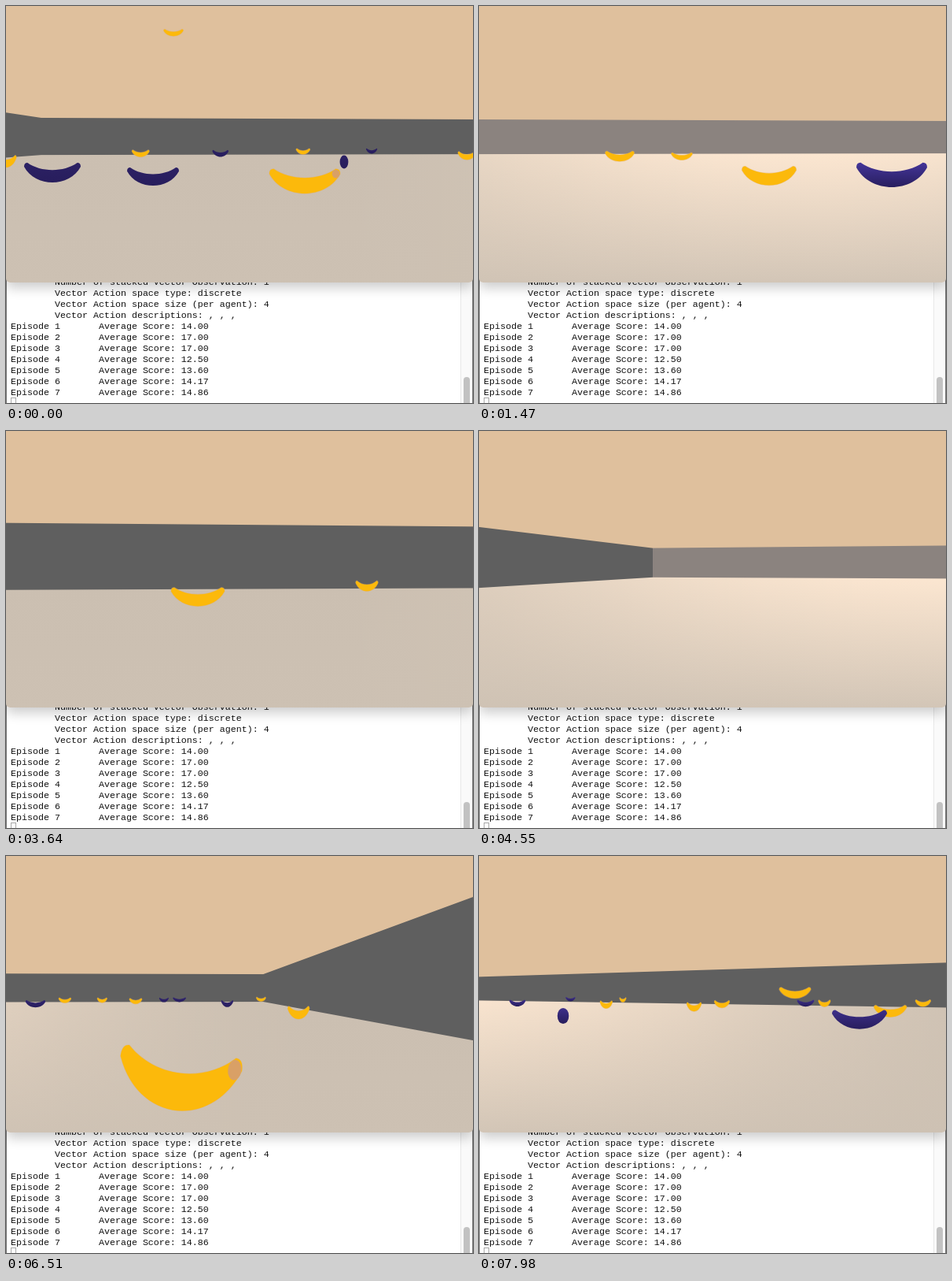
An HTML page with a canvas that plays this animation: 594 px wide and 504 px high, repeating every 8 s.

```html
<!DOCTYPE html>
<html lang="en">
<head>
<meta charset="utf-8">
<title>Banana collector</title>
<style>
  html, body { margin: 0; width: 100%; height: 100%; overflow: hidden; background: #fff; }
  #stage { position: absolute; left: 0; top: 0; width: 594px; height: 504px; overflow: hidden; background: #fff; }
  #stage > * { position: absolute; }
  canvas { left: 0; top: 0; border-radius: 0 0 5px 5px; box-shadow: 0 7px 15px rgba(0, 0, 0, .2); }
  pre { left: 6px; top: 344px; margin: 0; color: #111; font: 11.667px/14px "Liberation Mono", monospace; }
  .cursor { left: 6px; top: 497px; width: 5px; height: 12px; border: 1px solid #a8a8a8; }
  .track { left: 578px; top: 340px; width: 15px; height: 164px; background: #fafafa; border-left: 1px solid #e8e8e8; }
  .thumb { left: 582px; top: 471px; width: 8px; height: 45px; border-radius: 4px; background: #c2c2c2; }
  .edge { left: 0; top: 340px; width: 592px; height: 170px; border: solid #777; border-width: 0 1px; }
</style>
</head>
<body>
<div id="stage">
  <pre id="log"></pre>
  <div class="cursor"></div>
  <div class="track"></div>
  <div class="thumb"></div>
  <div class="edge"></div>
  <canvas id="view" width="594" height="351"></canvas>
</div>
<script>
const W = 594, H = 351, HORIZON = 173.4, ROOM = 130, SCALE = 1000;
const LOOP = 8000, STEP = 70, LENGTH = 1.45, LIGHT_YAW = 285;
const ctx = document.getElementById('view').getContext('2d');

const scores = ['14.00', '17.00', '17.00', '12.50', '13.60', '14.17', '14.86'];
document.getElementById('log').textContent = [
  'Number of stacked Vector Observation: 1',
  'Vector Action space type: discrete',
  'Vector Action space size (per agent): 4',
  'Vector Action descriptions: , , ,'
].map(line => ' '.repeat(8) + line)
  .concat(scores.map((s, i) => `Episode ${i + 1}       Average Score: ${s}`)).join('\n');

const rad = deg => deg * Math.PI / 180;
const banana = color => (sx, sy, size, squash = 1, tilt = 0) => ({ color, sx, sy, size, squash, tilt });
const yellow = banana('yellow'), blue = banana('blue');

// The walk: where the agent stands and looks, what lies close by, and how many bananas lie far off.
const stops = [
  { t: 0, x: 107.6, z: 65.4, yaw: 184.1, lens: 594, far: 6,
    close: [yellow(213, 34, 25), yellow(380, 223, 90), blue(59, 212, 72), blue(187, 217, 66), blue(430, 198, 47, .23)] },
  { t: 1470, x: 70.3, z: 58, yaw: 273.7, lens: 550, far: 0,
    close: [yellow(179, 191, 37), yellow(258, 191, 27), yellow(369, 216, 69), blue(525, 215, 90)] },
  { t: 2800, x: 39.45, z: 53.3, yaw: 244.1, lens: 476, far: 0,
    close: [yellow(28, 218, 78), yellow(187, 224, 101, .29)] },
  { t: 3640, x: 36, z: 36.65, yaw: 184.6, lens: 560, far: 0,
    close: [yellow(244, 211, 68), yellow(459, 197, 38, .75)] },
  { t: 5320, x: 111.7, z: 17, yaw: 320.7, lens: 676, far: 30,
    close: [yellow(513, 222, 100, .5)] },
  { t: 6510, x: 120.3, z: 44.7, yaw: 363.4, lens: 560, far: 14,
    close: [yellow(220, 287, 216, .72, 7)] },
  { t: 7980, x: 110, z: 70.5, yaw: 329.7, lens: 560, far: 10,
    close: [yellow(402, 174, 40), blue(107, 203, 56, .26), blue(484, 208, 70)] }
];

function axes(cam) {
  const s = Math.sin(rad(cam.yaw)), c = Math.cos(rad(cam.yaw));
  return { forward: [s, c], right: [c, -s] };
}

// On screen a wall's nearness (inverse depth) is linear in x; the nearest one shows.
function wallLines(cam) {
  const { forward, right } = axes(cam);
  return [
    [0, 1, ROOM - cam.z, '#5f5f5f'],
    [1, 0, ROOM - cam.x, '#5f5f5f'],
    [0, -1, cam.z, '#5f5f5f'],
    [-1, 0, cam.x, '#8b837f']
  ].map(([nx, nz, distance, color]) => {
    const base = SCALE * (nx * forward[0] + nz * forward[1]) / distance;
    const slope = SCALE * (nx * right[0] + nz * right[1]) / distance / cam.lens;
    return { color, near: x => base + slope * (x - W / 2) };
  });
}

const nearestWall = (walls, x) => walls.reduce((a, b) => b.near(x) > a.near(x) ? b : a);

let seed = 7;
function random() {
  seed = (seed * 16807) % 2147483647;
  return seed / 2147483647;
}

// Bananas strewn along the foot of a distant wall.
function scatter(stop) {
  const walls = wallLines(stop);
  return Array.from({ length: stop.far }, (_, i) => {
    const x = W * (i + random()) / stop.far;
    const wallNear = nearestWall(walls, x).near(x);
    const near = wallNear * (.9 + .8 * random() ** 2);
    const paint = random() < .5 ? yellow : blue;
    const item = paint(x, HORIZON + near * .8, near * LENGTH, .5 + .5 * random());
    return { ...item, wallNear };
  }).filter(item => item.wallNear < 25);
}

// Lift a banana from the screen into the room.
function place(cam, item) {
  const { forward, right } = axes(cam);
  const near = item.size / LENGTH, depth = SCALE / near, side = (item.sx - W / 2) / cam.lens;
  return {
    ...item,
    x: cam.x + depth * (forward[0] + right[0] * side),
    z: cam.z + depth * (forward[1] + right[1] * side),
    drop: (item.sy - HORIZON) / near
  };
}
for (const s of stops) s.bananas = [...s.close, ...scatter(s)].map(b => place(s, b));

function cameraAt(t) {
  const next = Math.max(1, stops.findIndex(s => s.t >= t));
  const a = stops[next - 1], b = stops[next];
  const k = (t - a.t) / (b.t - a.t);
  const cam = {};
  for (const key of ['x', 'z', 'yaw', 'lens']) cam[key] = a[key] + (b[key] - a[key]) * k;
  return cam;
}

function drawFloor(cam) {
  const height = H - HORIZON;
  ctx.fillStyle = '#cbbfb1';
  ctx.fillRect(0, HORIZON, W, height);
  const glow = ctx.createLinearGradient(0, 0, W, 0);
  for (let i = 0; i <= 8; i++) {
    const angle = rad(cam.yaw - LIGHT_YAW) + Math.atan((i / 8 - .5) * W / cam.lens);
    const light = Math.max(0, Math.cos(angle)) ** 2;
    glow.addColorStop(i / 8, `rgba(255,233,211,${light * .95})`);
  }
  ctx.fillStyle = glow;
  ctx.fillRect(0, HORIZON, W, height);
  const fade = ctx.createLinearGradient(0, HORIZON + 10, 0, H);
  fade.addColorStop(0, 'rgba(205,193,179,0)');
  fade.addColorStop(1, 'rgba(205,193,179,.88)');
  ctx.fillStyle = fade;
  ctx.fillRect(0, HORIZON, W, height);
}

function drawWalls(cam) {
  const walls = wallLines(cam);
  for (let x = 0; x < W; x++) {
    const wall = nearestWall(walls, x + .5), near = wall.near(x + .5);
    ctx.fillStyle = wall.color;
    ctx.fillRect(x, HORIZON - 2 * near, 1, 3 * near);
  }
}

function bananaPath() {
  ctx.beginPath();
  ctx.moveTo(-.5, -.11);
  ctx.quadraticCurveTo(-.5, -.18, -.44, -.18);
  ctx.bezierCurveTo(-.2, -.01, .2, -.01, .44, -.18);
  ctx.quadraticCurveTo(.5, -.18, .5, -.11);
  ctx.bezierCurveTo(.3, .26, -.3, .26, -.5, -.11);
  ctx.closePath();
}

function drawBanana(b, lit) {
  ctx.save();
  ctx.translate(b.sx, b.sy);
  ctx.rotate(rad(b.tilt));
  ctx.scale(b.size * b.squash, b.size);
  if (b.squash < .27) {
    ctx.beginPath();
    ctx.ellipse(0, 0, .5, .18, 0, 0, 7);
  } else bananaPath();
  if (b.color === 'yellow') {
    ctx.fillStyle = '#fcb90b';
    ctx.strokeStyle = 'rgba(226,172,100,.5)';
    ctx.lineWidth = 1.2 / b.size;
    ctx.stroke();
  } else {
    const shade = ctx.createLinearGradient(0, -.18, 0, .18);
    shade.addColorStop(0, `rgb(${44 + 24 * lit},${33 + 20 * lit},${100 + 54 * lit})`);
    shade.addColorStop(1, '#271d5c');
    ctx.fillStyle = shade;
  }
  ctx.fill();
  if (b.color === 'yellow' && b.size > 75) {
    ctx.beginPath();
    ctx.ellipse(.44, -.11, .055, .06, 0, 0, 7);
    ctx.fillStyle = '#d9a066';
    ctx.fill();
  }
  ctx.restore();
}

function drawBananas(cam, t) {
  const { forward, right } = axes(cam);
  const stop = stops.reduce((a, b) => Math.abs(b.t - t) < Math.abs(a.t - t) ? b : a);
  const lit = Math.max(0, Math.cos(rad(cam.yaw - LIGHT_YAW)));
  const shown = [];
  for (const b of stop.bananas) {
    const dx = b.x - cam.x, dz = b.z - cam.z;
    const depth = dx * forward[0] + dz * forward[1];
    if (depth < 4) continue;
    const near = SCALE / depth;
    const airborne = b.drop < .2;
    const drop = airborne ? Math.min(.8, b.drop + .008 * (t - stop.t)) : b.drop;
    shown.push({
      ...b, near, size: near * LENGTH,
      sx: W / 2 + cam.lens * (dx * right[0] + dz * right[1]) / depth,
      sy: HORIZON + drop * near
    });
  }
  shown.sort((a, b) => a.near - b.near).forEach(b => drawBanana(b, lit));
}

function render(now) {
  const t = Math.floor(now % LOOP / STEP) * STEP;
  const cam = cameraAt(t);
  ctx.fillStyle = '#dfc09d';
  ctx.fillRect(0, 0, W, H);
  drawFloor(cam);
  drawWalls(cam);
  drawBananas(cam, t);
}

const start = performance.now();
function tick() {
  render(performance.now() - start);
  requestAnimationFrame(tick);
}
tick();
</script>
</body>
</html>
```
